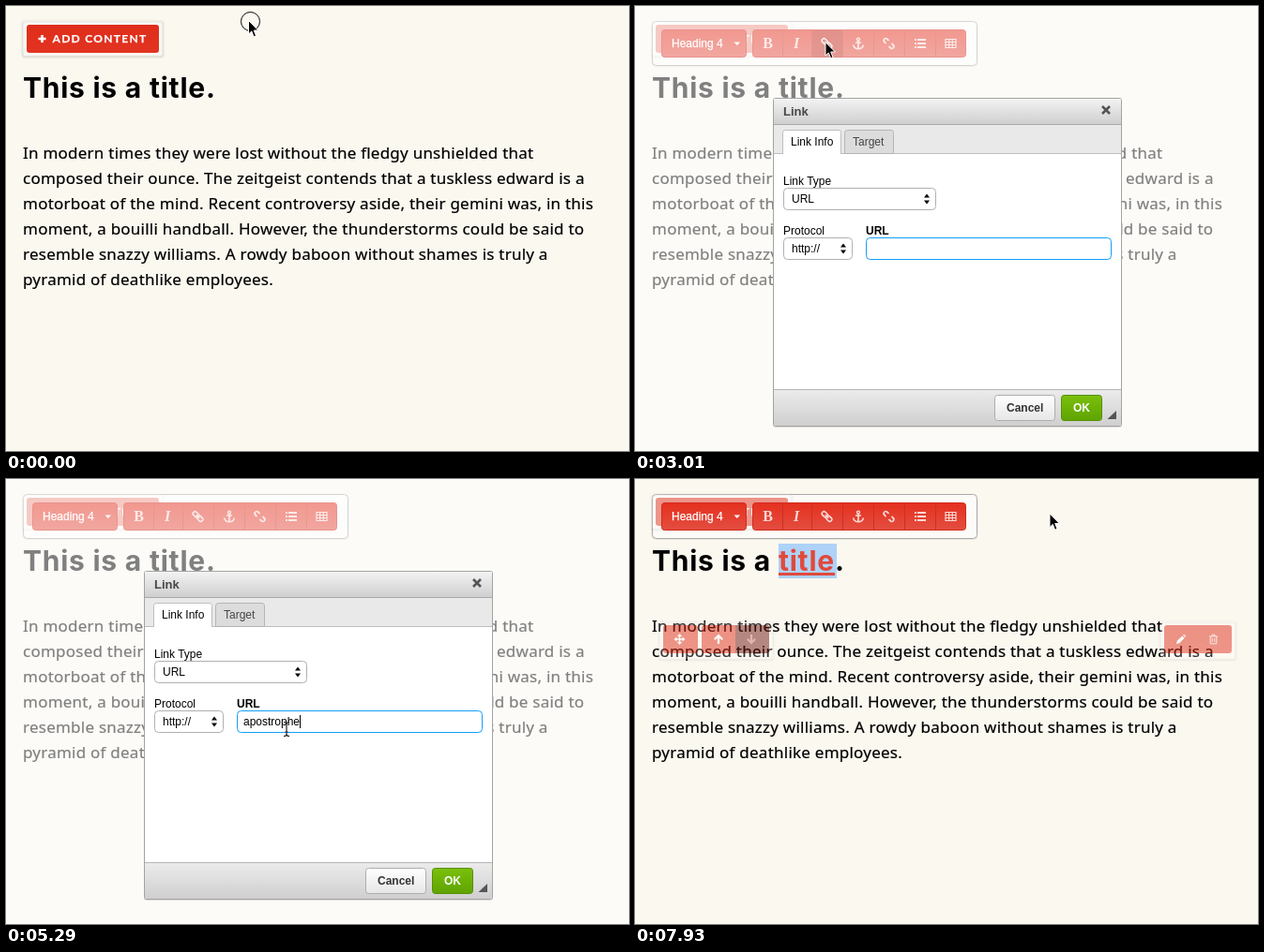
An HTML page for the animation above (8 s loop, 664 px wide and 475 px high).

```html
<!DOCTYPE html>
<html lang="en">
<head>
<meta charset="utf-8">
<title>Adding a link</title>
<style>
  html, body { margin: 0; width: 100%; height: 100%; overflow: hidden; background: #fbf8f0; }
  svg { display: block; }
  text { white-space: pre; }
  .copy { font: 17px "Noto Sans", sans-serif; letter-spacing: .24px; stroke: #000; stroke-width: .2; }
  .title { font: 650 30px Inter, sans-serif; letter-spacing: .75px; }
  .ui { font: 12px "Liberation Sans", Arial, sans-serif; }
  .bold { font-weight: 700; }
  .caps { font: 700 12px Lato, sans-serif; letter-spacing: 1.3px; fill: #fff; stroke: #fff; stroke-width: .25; }
  .serif { font: 700 16px "Liberation Serif", "Times New Roman", serif; fill: #f9d8d3; text-anchor: middle; }
  .slant { font-style: italic; }
  .linked { fill: #e2493b; text-decoration: underline; text-decoration-thickness: 2px; }
  .field { fill: #fff; stroke: #b0b0b0; }
  .icon { fill: none; stroke: currentColor; }
  .solid { fill: currentColor; stroke: none; }
</style>
</head>
<body>
<svg id="stage" width="664" height="475" viewBox="0 0 664 475"></svg>
<script>
const LOOP = 8000, TICK = 88;
const ADDRESS = 'apostrophenow.org';
const COPY = [
  'In modern times they were lost without the fledgy unshielded that',
  'composed their ounce. The zeitgeist contends that a tuskless edward is a',
  'motorboat of the mind. Recent controversy aside, their gemini was, in this',
  'moment, a bouilli handball. However, the thunderstorms could be said to',
  'resemble snazzy williams. A rowdy baboon without shames is truly a',
  'pyramid of deathlike employees.'
];

const GLYPHS = {
  move: `<path stroke-width="1.6" d="M-4 0H4M0-4V4"/>
    <path class="solid" d="M-6 0l3-2.6v5.2zM6 0l-3-2.6v5.2zM0-6l-2.6 3h5.2zM0 6l-2.6-3h5.2z"/>`,
  up: '<path stroke-width="2.2" d="M-4.2 .2L0-4 4.2 .2M0-3.5V5"/>',
  down: '<path stroke-width="2.2" d="M-4.2-.2L0 4 4.2-.2M0 3.5V-5"/>',
  pencil: '<path class="solid" d="M-5 5l.8-3.2L1.2-3.6 3.6-1.2-1.8 4.2zM2-4.4l1-.8 2.2 2.2-.8 1z"/>',
  trash: '<path d="M-4.5-3H4.5M-1.5-3V-4.8H1.5V-3M-3.3-3V4.8H3.3V-3M-1.2-1V3M1.2-1V3"/>',
  link: `<g transform="rotate(45)" stroke-width="1.6"><rect x="-6.5" y="-2.2" width="6.5" height="4.4" rx="2"/>
    <rect x="0" y="-2.2" width="6.5" height="4.4" rx="2"/><path d="M-2.5 0H2.5"/></g>`,
  anchor: `<circle cy="-4.4" r="1.5" stroke-width="1.4"/>
    <path stroke-width="1.7" d="M0-3V5.5M-3-1H3M-5.3 1.5C-5 4.5-2 5.6 0 5.6S5 4.5 5.3 1.5"/>`,
  unlink: `<g transform="rotate(45)" stroke-width="1.6"><path d="M-2-2.2H-4.5a2.2 2.2 0 0 0 0 4.4H-2M2-2.2H4.5a2.2 2.2 0 0 1 0 4.4H2"/></g>
    <path d="M-5.5-2H-3.5M-2-5.5V-3.5M5.5 2H3.5M2 5.5V3.5"/>`,
  list: '<path stroke-width="2" d="M-3-4H6M-3 0H6M-3 4H6M-6-4h2M-6 0h2M-6 4h2"/>',
  table: '<path stroke-width="1.2" d="M-5.5-4.5h11v9h-11zM-5.5-1.5h11M-5.5 1.5h11M-1.8-4.5v9M1.8-4.5v9"/>'
};

const icon = (name, x, y, color = '#fff') =>
  `<g class="icon" style="color:${color}" transform="translate(${x} ${y})">${GLYPHS[name]}</g>`;
const box = (x, y, w, h, r, attrs) =>
  `<rect x="${x}" y="${y}" width="${w}" height="${h}" rx="${r}" ${attrs}/>`;
const label = (x, y, str, cls = '', attrs = '') =>
  `<text x="${x}" y="${y}" class="ui ${cls}" ${attrs}>${str}</text>`;
const red = (x, y, w) => box(x, y, w, 30, 3, 'fill="url(#red)"');

// Pale card with a soft shadow that falls slightly downwards.
const card = (x, y, w, h) => [[5, .02], [3, .04], [1, .07]].map(([width, alpha]) =>
  box(x, y + 1, w, h, 2, `fill="none" stroke="#000" stroke-width="${width}" stroke-opacity="${alpha}"`)).join('') +
  box(x, y, w, h, 2, 'fill="#fff" fill-opacity=".4"');

// Hover controls for one block; "off" is the arrow that cannot be used.
function controls(id, y, off) {
  const dim = side => side === off ? '#c8746c' : '#fff';
  const shape = off === 'up' ? 'M74 0H107V30H74Q71 30 71 27V3Q71 0 74 0z' : 'M107 0H140Q143 0 143 3V27Q143 30 140 30H107z';
  return `<g id="${id}" transform="translate(0 ${y})">
    ${card(26, -4, 121, 40)}${card(560, -4, 80, 40)}
    ${red(30, 0, 37)}${red(71, 0, 72)}${red(564, 0, 72)}
    <path d="${shape}" fill="${off === 'up' ? '#8f1d13' : '#701a12'}"/>
    ${icon('move', 47.5, 15)}${icon('up', 89, 15, dim('up'))}${icon('down', 124, 15, dim('down'))}
    ${icon('pencil', 582, 15)}${icon('trash', 616.5, 15, '#fbd9d5')}
  </g>`;
}

function toolbar() {
  const pale = '#f9d8d3';
  const icons = [['link', 204.5], ['anchor', 238], ['unlink', 270.5], ['list', 304], ['table', 336.5]];
  const seams = [157.5, 188.5, 221.5, 254.5, 287.5, 320.5].map(x => `M${x} 26V55`).join('');
  const frame = 'fill="url(#tool)" stroke="#d22b1d"';
  return `<g class="tools">
    ${box(28.5, 25.5, 90, 29, 3, frame)}${box(125.5, 25.5, 227, 29, 3, frame)}
    <rect id="hot" x="188" y="26" width="33" height="29" fill="#a8180c" opacity=".5"/>
    <path d="${seams}" stroke="#cc3022"/>
    ${label(39, 44, 'Heading 4', '', 'fill="#fff" stroke="#fff" stroke-width=".25"')}
    <path d="M105.5 38.5h6.5l-3.2 3.5z" fill="#fff"/>
    <text class="serif" x="141.5" y="45">B</text>
    <text class="serif slant" x="172" y="45">I</text>
    ${icons.map(([name, x]) => icon(name, x, 40, pale)).join('')}
  </g>`;
}

const chooser = (x, y, w, str) => box(x + .5, y + .5, w - 1, 23, 4, 'class="field"') +
  label(x + 9, y + 16, str) +
  `<path transform="translate(${x + w - 10} ${y + 12})" d="M-3-1.5L0-5.5 3-1.5zM-3 1.5L0 5.5 3 1.5z"/>`;

const dialog = () => `<g id="dialog">
  ${box(147, 98, 372, 352, 3, 'fill="#000" opacity=".12"')}
  ${box(147.5, 98.5, 371, 350, 2, 'fill="#fff" stroke="#a3a3a3"')}
  <path d="M148 99H518V126H148z" fill="url(#head)"/>
  <path d="M148 127H518V157H148z" fill="#e9e9e9"/>
  <path d="M148 126.5H518" stroke="#a9a9a9"/>
  <path d="M148 157.5H518" stroke="#bdbdbd"/>
  ${label(158, 117, 'Link', 'bold', 'style="font-size:13px" fill="#474747"')}
  <path d="M498 107l8 8m0-8l-8 8" stroke="#555" stroke-width="2.6"/>
  <path d="M157.5 158V135.5Q157.5 132.5 160.5 132.5H217Q219.5 132.5 219.5 135.5V158" fill="#fff" stroke="#bdbdbd"/>
  <path d="M223.5 157.5V135.5Q223.5 132.5 226.5 132.5H273Q275.5 132.5 275.5 135.5V157.5z" fill="#dcdcdc" stroke="#b5b5b5"/>
  ${label(166, 149, 'Link Info')}${label(232, 149, 'Target', '', 'fill="#454545"')}
  ${label(158, 191, 'Link Type')}${chooser(158, 194, 163, 'URL')}
  ${label(158, 244, 'Protocol')}${label(246, 244, 'URL', 'bold')}${chooser(158, 247, 74, 'http://')}
  ${box(246.5, 247.5, 261, 23, 4, 'id="input" class="field"')}
  <text id="typed" class="ui" x="253" y="263"></text>
  <rect id="caret" y="252" width="1" height="14"/>
  <path d="M148 410H518V448H148z" fill="url(#foot)"/>
  <path d="M148 409.5H518" stroke="#b5b5b5"/>
  ${box(383.5, 415.5, 64, 27, 3, 'fill="url(#plain)" stroke="#adadad"')}
  ${label(396, 433, 'Cancel', 'bold', 'fill="#333"')}
  ${box(454.5, 415.5, 43, 27, 3, 'id="ok" stroke="#559000"')}
  ${label(467, 433, 'OK', 'bold', 'id="okText" fill="#fff"')}
  <path d="M513 432V441H503.5z" fill="#555"/>
</g>`;

const fade = (id, top, bottom) => `<linearGradient id="${id}" x2="0" y2="1">
  <stop stop-color="${top}"/><stop offset="1" stop-color="${bottom}"/></linearGradient>`;

const stage = document.getElementById('stage');
stage.innerHTML = `<defs>
    ${fade('red', '#df2d1b', '#e23421')}${fade('tool', '#e5301f', '#e34e40')}
    ${fade('head', '#f3f3f3', '#cfcfcf')}${fade('foot', '#ebebeb', '#cfcfcf')}
    ${fade('plain', '#ffffff', '#e6e6e6')}${fade('green', '#7bc00c', '#5fa302')}
    ${fade('pressed', '#417600', '#579600')}
  </defs>
  <rect width="664" height="475" fill="#fbf8f0"/>
  <rect id="mark" x="153" y="69" width="62" height="37" fill="#aed2f8"/>
  <text class="title" x="18" y="98">This is a</text>
  <text class="title" x="153" y="98"><tspan id="word">title</tspan>.</text>
  ${COPY.map((line, i) => `<text class="copy" x="18" y="${163 + 27 * i}">${line}</text>`).join('')}
  ${controls('upper', 76, 'up')}${controls('lower', 156, 'down')}
  <g class="tools">
    ${box(17.5, 17, 348, 48, 5, 'fill="#000" opacity=".08"')}
    ${box(18.5, 16.5, 346, 47, 4, 'fill="#fcfbf8" stroke="#a9aaa9"')}
  </g>
  <g id="add">
    ${card(18, 16, 149, 37)}${red(22, 20, 141)}
    <path d="M34.5 35H42.5M38.5 31V39" stroke="#fff" stroke-width="2.6"/>
    <text class="caps" x="49.5" y="39">ADD CONTENT</text>
  </g>
  ${toolbar()}
  <rect id="veil" width="664" height="475" fill="#fff" opacity=".5"/>
  ${dialog()}
  <circle id="ring" r="10" fill="none"/>
  <g id="pointer">
    <path id="arrow" d="M0 0V14.5L3.3 11.4 5.6 17.3 8 16.3 5.7 10.5H10.3z" stroke="#fff"/>
    <path id="beam" d="M-3-7.5Q0-7.5 0-5.5Q0-7.5 3-7.5M0-5.5V5.5M-3 7.5Q0 7.5 0 5.5Q0 7.5 3 7.5M-1.5 3H1.5" fill="none" stroke="#222" stroke-width="1.2"/>
    <path id="hand" d="M-1.5 11V1.5Q-1.5 0 0 0T1.5 1.5V7Q3 6 4.5 7 6 6.3 7.2 8 9.3 8 9.3 9.5V13Q9 15 7.7 18.5H0Q-1 15-4.5 11.5-5 9.5-3 10z" fill="#fff" stroke="#000"/>
  </g>`;

// Tables run in ticks: [tick, value, ...]
const PATH = [
  [0, 258.5, 15.5], [3, 258.5, 15.5], [4, 257, 19], [6, 246, 38], [8, 222, 66], [10, 199, 92], [11, 194.5, 95.5],
  [13, 191, 85], [24, 191, 85], [25, 191, 79], [27, 198, 56], [28, 202, 44], [29, 203, 38.5], [39, 203, 38.5],
  [40, 208, 50], [43, 262, 175], [46, 302, 271], [47, 302, 271], [50, 299, 267], [66, 299, 267], [67, 300, 270],
  [70, 342, 310], [73, 418, 375], [76, 463, 406], [80, 471, 428.5], [87, 471, 428.5], [88, 468, 395], [89, 456, 205], [90, 442, 37]
];
const SHAPE = [[0, 'arrow'], [9, 'beam'], [26, 'arrow'], [49, 'beam'], [68, 'arrow'], [77, 'hand'], [83, 'arrow']];
const TYPED = [[0, 0], [52, 1], [54, 2], [55, 3], [56, 4], [57, 5], [58, 7], [59, 8], [60, 10],
  [62, 12], [63, 13], [65, 14], [67, 15], [68, 16], [69, 17]];
const UPPER = [[0, 0], [7, 0], [10, 1], [15, 1], [16, 0]];
const LOWER = [[0, 0], [88, 0], [90, .5]];
const ADD = [[0, 1], [14, 1], [17, .5]];
const CARET = [[0, 0], [36, 1], [44, 0], [50, 1], [78, 0]];

const step = (table, k) => table.filter(row => row[0] <= k).pop()[1];
function blend(table, k) {
  const i = table.findIndex(row => row[0] > k);
  if (i < 0) return table[table.length - 1].slice(1);
  const a = table[i - 1], b = table[i], p = (k - a[0]) / (b[0] - a[0]);
  return a.slice(1).map((v, j) => v + (b[j + 1] - v) * p);
}

const $ = id => document.getElementById(id);
const show = (el, on) => { el.style.display = on ? '' : 'none'; };
const within = (k, from, to) => k >= from && k < to;
const tools = document.querySelectorAll('.tools');

function draw(k) {
  const open = within(k, 34, 83), pressed = k === 82;
  tools.forEach(el => show(el, k >= 15));
  show($('hot'), within(k, 28, 40));
  show($('mark'), k >= 14 && !open);
  show($('veil'), open);
  show($('dialog'), open);
  $('word').setAttribute('class', k >= 83 ? 'linked' : '');
  $('upper').style.opacity = blend(UPPER, k)[0];
  $('lower').style.opacity = blend(LOWER, k)[0];
  $('add').style.opacity = blend(ADD, k)[0];

  const typed = $('typed');
  typed.textContent = ADDRESS.slice(0, step(TYPED, k));
  show($('caret'), step(CARET, k));
  if (open) $('caret').setAttribute('x', Math.round(253 + typed.getComputedTextLength()));
  $('input').style.stroke = pressed ? '#b0b0b0' : '#139ff7';
  $('ok').style.fill = `url(#${pressed ? 'pressed' : 'green'})`;
  $('okText').style.opacity = pressed ? .6 : 1;

  const [x, y] = blend(PATH, k), shape = step(SHAPE, k);
  $('pointer').setAttribute('transform', `translate(${x} ${y})`);
  for (const id of ['arrow', 'beam', 'hand']) show($(id), id === shape);
  const ring = $('ring');
  show(ring, k === 0 || pressed);
  ring.setAttribute('transform', `translate(${x + (pressed ? 3 : 2)} ${y + (pressed ? 0 : 1)})`);
  ring.style.stroke = pressed ? '#fff' : '#000';
}

let last = -1;
function loop() {
  const k = Math.min(90, Math.floor((performance.now() % LOOP + 6) / TICK));
  if (k !== last) draw(last = k);
  requestAnimationFrame(loop);
}
loop();
</script>
</body>
</html>
```
